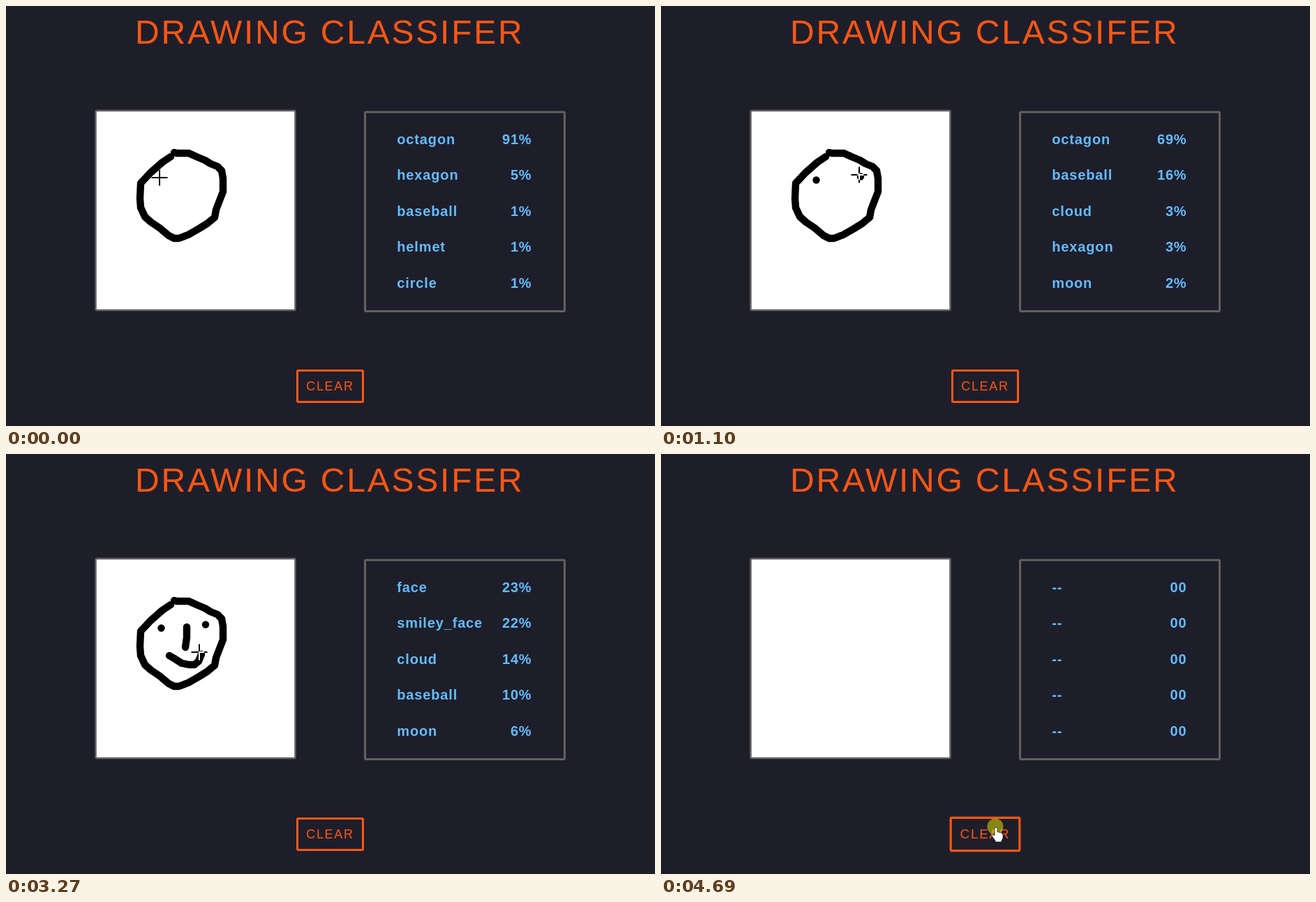
These frames come from a looping animation (930x602 px, 4760 ms). An HTML page:

```html
<!DOCTYPE html>
<html lang="en">
<head>
<meta charset="utf-8">
<title>Drawing classifier</title>
<style>
  html, body { margin: 0; width: 100%; height: 100%; overflow: hidden; background: #1e1e2a; }
  svg { display: block; width: 930px; height: 602px; isolation: isolate; }
  text { font-family: "Liberation Sans", Arial, sans-serif; white-space: pre; }
  .title { font-size: 48px; letter-spacing: 2.78px; fill: #ff5714; }
  .row { font-size: 20px; font-weight: bold; letter-spacing: .85px; fill: #64bcff; }
  .label { font-size: 18px; letter-spacing: 1.7px; fill: #ff5714; }
  .ink { fill: none; stroke: #000; stroke-width: 10.4; stroke-linecap: round; stroke-linejoin: round; }
  .frame { stroke: #616161; }
  #cross { mix-blend-mode: difference; stroke: #fff; stroke-width: 2; }
</style>
</head>
<body>
<svg viewBox="0 0 930 602">
  <rect width="930" height="602" fill="#1e1e2a"/>
  <text class="title" x="185" y="54">DRAWING CLASSIFER</text>
  <rect class="frame" x="128.5" y="150" width="286" height="286" rx="1.5" fill="#fff" stroke-width="2.5"/>
  <rect class="frame" x="514.5" y="152" width="286" height="285.5" rx="1.5" fill="none" stroke-width="3"/>
  <g id="rows"></g>
  <g id="drawing">
    <polyline class="ink" id="outline"/>
    <polyline class="ink" id="nose"/>
    <polyline class="ink" id="mouth"/>
    <circle id="eyeL" cx="222.5" cy="249.5" r="5.2"/>
    <circle id="eyeR" cx="286" cy="244.5" r="5.2"/>
  </g>
  <g id="button">
    <rect x="417.5" y="522.5" width="94" height="45" rx="1.5" fill="none" stroke="#ff5714" stroke-width="3"/>
    <text class="label" id="label" x="430.2" y="551">CLEAR</text>
  </g>
  <circle id="press" r="11.5" fill="#ff0" fill-opacity=".47"/>
  <path id="cross" d="M-11.5 0H11.5M0-11.5V11.5"/>
  <path id="arrow" d="M.5 .5V16.5L4.2 13L6.7 18.7L9 17.7L6.6 12H11.7Z" fill="#fff" stroke="#000" stroke-width=".8"/>
  <path id="hand" d="M-2 1.5Q0-1.2 2 1.5V7Q4 5.8 5 7.8Q7 6.8 7.8 8.8Q10 8.3 10 11V15Q9.5 17.5 8 19V21H-1V19Q-4 15.5-6 12Q-5.5 9.2-2 12Z"
    fill="#fff" stroke="#15151c" stroke-width=".7"/>
</svg>
<script>
const LOOP = 4760;
const $ = id => document.getElementById(id);

const outline = [[241,210],[245,211],[262,211],[273,216],[285,221],[293,226],[303,230],[309,236],
  [311,247],[311,266],[306,279],[301,292],[299,303],[288,312],[275,320],[261,328],[248,333],[241,333],
  [233,329],[220,318],[208,310],[199,302],[193,289],[192,276],[193,254],[207,239],[224,224],[236,216]];
const nose = [[259,248],[259,263],[257,277]];
const mouth = [[234,289],[241,293],[252,300],[262,302],[270,302],[276,297],[280,287]];

// Each result list holds from its start time on.
const results = [
  [0, "octagon 91%,hexagon 5%,baseball 1%,helmet 1%,circle 1%"],
  [300, "octagon 84%,baseball 7%,hexagon 5%,cloud 1%,eyeglasses 1%"],
  [1100, "octagon 69%,baseball 16%,cloud 3%,hexagon 3%,moon 2%"],
  [2260, "face 23%,smiley_face 22%,cloud 14%,baseball 10%,moon 6%"],
  [4690, Array(5).fill("-- 00").join()]
];

function addText(x, y, anchor) {
  const el = document.createElementNS("http://www.w3.org/2000/svg", "text");
  el.setAttribute("class", "row");
  el.setAttribute("x", x);
  el.setAttribute("y", y);
  el.setAttribute("text-anchor", anchor);
  $("rows").append(el);
  return el;
}
const rows = [198, 249, 301, 352, 404].map(y => [addText(560.3, y, "start"), addText(753.5, y, "end")]);

const show = (id, on) => $(id).setAttribute("visibility", on ? "visible" : "hidden");
const place = (id, [x, y]) => $(id).setAttribute("transform", `translate(${x} ${y})`);
const trace = (id, pts) => $(id).setAttribute("points", pts.join(" "));
const mix = (a, b, p) => a.map((v, i) => Math.round(v + (b[i] - v) * p));

// Index 0..6 of the seven steps between two times, -1 before them.
function step(t, from, to) {
  if (t < from) return -1;
  return Math.min(6, Math.floor((t - from) / (to - from) * 6 + 0.15));
}

function pointer(t, noseLen, mouthLen) {
  const behind = ([x, y]) => [x - 3, y - 3];
  if (t < 150) return [220, 246];
  if (t < 1260) return mix([220, 247], [284, 242], (step(t, 470, 930) + 1) / 7);
  if (t < 1800) return mix([284, 242], [263, 247], (step(t, 1260, 1730) + 1) / 7);
  if (t < 3270) {
    if (mouthLen) return behind(mouth[mouthLen - 1]);
    if (noseLen) return behind(nose[noseLen - 1]);
    return step(t, 1800, 2260) ? [258, 246] : [260, 247];
  }
  if (t < 3820) {
    const p = step(t, 3270, 3740) / 6;
    return mix([277, 284], [405, 531], p * p * (3 - 2 * p));
  }
  if (t < 4390) {
    const k = step(t, 3820, 4290);
    return k < 1 ? [441, 550] : mix([455, 552], [475, 550], (k - 1) / 5);
  }
  return [480, 535];
}

function draw(t) {
  const k = step(t, 1800, 2260);
  const noseLen = k < 2 ? 0 : Math.min(3, k);
  const mouthLen = k < 4 ? 0 : 3 + (k - 4) * 2;
  trace("nose", nose.slice(0, noseLen));
  trace("mouth", mouth.slice(0, mouthLen));
  show("eyeL", t >= 150);
  show("eyeR", t >= 1020);
  $("drawing").setAttribute("display", t < 4690 ? "inline" : "none");

  const list = results.filter(r => t >= r[0]).pop()[1].split(",");
  list.forEach((line, i) => line.split(" ").forEach((s, j) => {
    if (rows[i][j].textContent !== s) rows[i][j].textContent = s;
  }));

  const grow = Math.min(1, (step(t, 3820, 4290) + 1) / 4);
  $("button").setAttribute("transform",
    `translate(464.5 545) scale(${1 + 0.05 * grow}) translate(-464.5 -545)`);
  $("label").setAttribute("opacity", grow > 0 && grow < 1 ? 0.85 : 1);

  const pos = pointer(t, noseLen, mouthLen);
  const kind = t >= 3820 ? "hand" : pos[0] < 416 && pos[1] < 437 ? "cross" : "arrow";
  for (const id of ["cross", "arrow", "hand"]) show(id, id === kind);
  place(kind, pos);

  const pressed = t >= 150 && t < 300 || t >= 1020 && t < 1100 || k >= 2 && k < 6 || t >= 4690;
  show("press", pressed);
  place("press", kind === "hand" ? [pos[0] - 1, pos[1] - 1] : pos);
}

trace("outline", outline);
const start = performance.now();
function tick() {
  draw((performance.now() - start) % LOOP);
  requestAnimationFrame(tick);
}
tick();
</script>
</body>
</html>
```
